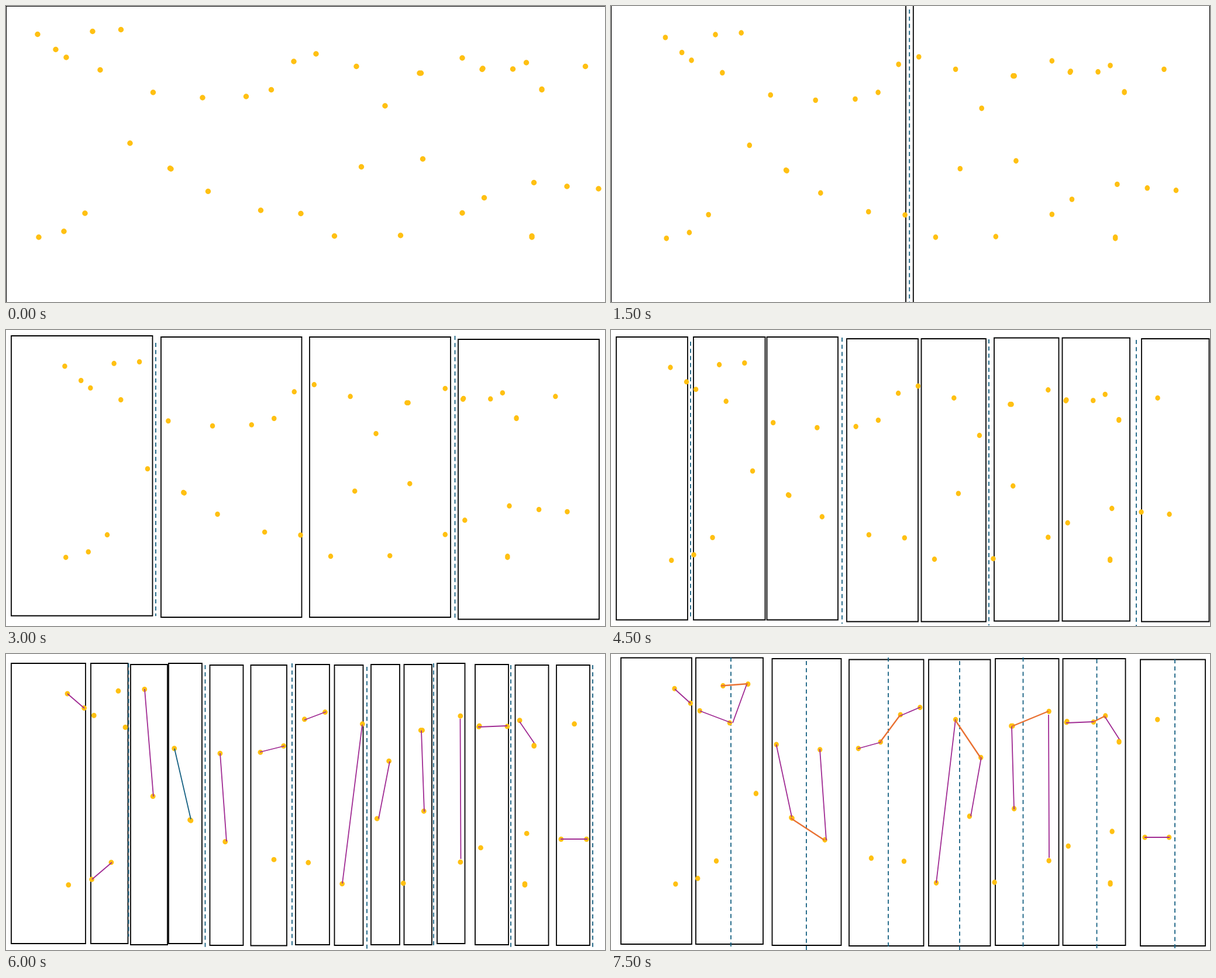
An HTML page that plays this animation: 1024x507 px, repeating every 8 s.

```html
<!DOCTYPE html>
<html lang="en">
<head>
<meta charset="utf-8">
<title>Splitting points into strips</title>
<style>
  html, body { margin: 0; width: 100%; height: 100%; overflow: hidden; background: #fff; }
  svg { display: block; width: 100%; height: 100%; }
  path { fill: none; stroke-width: 1.8; }
  .box { stroke: #000; }
  .thin { stroke-width: 1.1; }
  .cut { stroke: #156082; stroke-dasharray: 7 5.2; }
  .pair { stroke: #a02b93; }
  .left { stroke: #156082; }
  .join { stroke: #e97132; stroke-width: 2.4; }
  .dot { stroke: #ffc012; stroke-width: 9.5; stroke-linecap: round; }

  .step { visibility: hidden; animation: show 8s step-end calc(var(--i) * 1.5s - 8s) infinite; }
  .last { animation-name: show-last; }
  @keyframes show { 0% { visibility: visible } 18.75%, 100% { visibility: hidden } }
  @keyframes show-last { 0% { visibility: visible } 6.25%, 100% { visibility: hidden } }
</style>
</head>
<body>
<svg viewBox="0 0 1024 507" preserveAspectRatio="none">
  <defs>
    <!-- Each zero-length segment draws one round dot. -->
    <path id="fixed" class="dot" d="M54 48.5h0M85 74.5h0M103 88h0M148 43.5h0M196.5 40.5h0M161 109.5h0
      M251.5 148h0M336 157h0M410.5 155h0M453.5 143.5h0M492 95h0M530 82h0M599 103.5h0M707 115h0M709.5 115h0
      M648 171h0M780 89h0M814 108.5h0M815 107h0M866.5 108h0M889.5 97h0M916 142.5h0M916 143.5h0M990.5 103.5h0
      M212 235h0M280.5 278h0M282 279h0M345.5 317.5h0M435.5 350h0M561.5 394h0M674.5 393h0M712.5 262h0
      M780 354.5h0M817.5 328.5h0M902.5 302.5h0M1013 313h0M899 394h0M899 396h0M56 396h0M99 386h0M135 355h0"/>
    <g id="dots">
      <use href="#fixed"/>
      <path class="dot" d="M504 355.5h0M607.5 275.5h0M959 309h0"/>
    </g>
    <g id="moved">
      <use href="#fixed"/>
      <path class="dot" d="M499 355.5h0M626 275.5h0M966 313h0"/>
    </g>
  </defs>

  <g class="step" style="--i:0">
    <path class="box thin" d="M.5 507V.5H1024"/>
    <use href="#dots"/>
  </g>

  <g class="step" style="--i:1">
    <path class="box thin" d="M.5 0V507M1023.5 0V507"/>
    <path class="box" d="M504 0V507M516.8 0V507"/>
    <path class="cut" d="M510.2 6V507"/>
    <use href="#dots" transform="matrix(.9103 0 0 .99 43.8 5.9)"/>
  </g>

  <g class="step" style="--i:2">
    <path class="box" d="M9 10H250.5V489.5H9zM265 12H505.5V492H265zM519 12H760V492H519zM773 16H1014V495.5H773z"/>
    <path class="cut" d="M256 22V490M767.5 10V494"/>
    <use href="#dots" transform="matrix(.8957 0 0 .9423 52.1 16.3)"/>
  </g>

  <g class="step" style="--i:3">
    <path class="box" d="M9 12H131V496.5H9zM141 12H263.5V496.5H141zM266.5 12H388V496.5H266.5z
      M403 15H525V499.5H403zM530.5 15H641V499.5H530.5zM655 13.5H765.5V498.5H655z
      M771.5 13.5H887V498.5H771.5zM907 15H1022.5V499.5H907z"/>
    <path class="cut" d="M136 20V493M395 13V503M646 16V506M898 17V507"/>
    <use href="#dots" transform="matrix(.8895 0 0 .9508 53.5 18)"/>
  </g>

  <g class="step" style="--i:4">
    <path class="box" d="M9 16H136V496H9zM145 16H208.5V496H145zM213 18H276V498H213zM278 16H335V496H278z
      M348.5 19H405.5V499H348.5zM418.5 19H480V499.5H418.5zM495 18H553V498H495zM561.5 19H610.5V499H561.5z
      M624 18H673V498H624zM680.5 18H728V498H680.5zM737 16H784.5V496H737zM802 18H859V498H802z
      M870.5 19H927.5V499H870.5zM941 19H998V499H941z"/>
    <path class="cut" d="M209.5 16V484M340.5 19V503M489 16V500M617 22V506M731 16V500M863 19V503M1003 19V503"/>
    <use href="#moved" transform="matrix(.9254 0 0 .9424 55 22.3)"/>
    <path class="pair" d="M105 68L134 93M147 386L181 357M237 60L252 244M366 170L377 321M434 168L476 157.5
      M510 113L547 99M609 121L575 393M656 184L637 282M710 131L715 270M776.5 111L777.5 351
      M807 125L857 123M878 116L903 152.5M948 317H994"/>
    <path class="left" d="M288 162L316 283"/>
  </g>

  <g class="step last" style="--i:5">
    <path class="box" d="M17 6.5H138V497H17zM145 6.5H260V497H145zM275.5 8H393.5V499H275.5z
      M407 9.5H534.5V500H407zM543 9.5H648.5V500H543zM657 8H765.5V499H657z
      M772.5 8H879.5V499H772.5zM905 9.5H1016V500H905z"/>
    <path class="cut" d="M205 6V501M334 12V507M474 6V501M596 12V507M704.5 6V501M830.5 9V504M964 9V504"/>
    <use href="#moved" transform="matrix(.8816 0 0 .9634 61 12.5)"/>
    <path class="pair" d="M109 60L136 84.5M152 97.5L206 118M232 52L208 118M282.5 155L309 279M357 163L368 319
      M422 162L462 151M494 106L529 91M589 112L556 392M633 177L615 278M685 124L689 266
      M748 104L749 349M778 118L826 116M844 107L869 146M912 314H955"/>
    <path class="join" d="M188 54.5L234 51M307 281L365 319M460 151L494 105M589 114L632 178M685 124L748 98M825 116L845 106"/>
  </g>
</svg>
</body>
</html>
```
